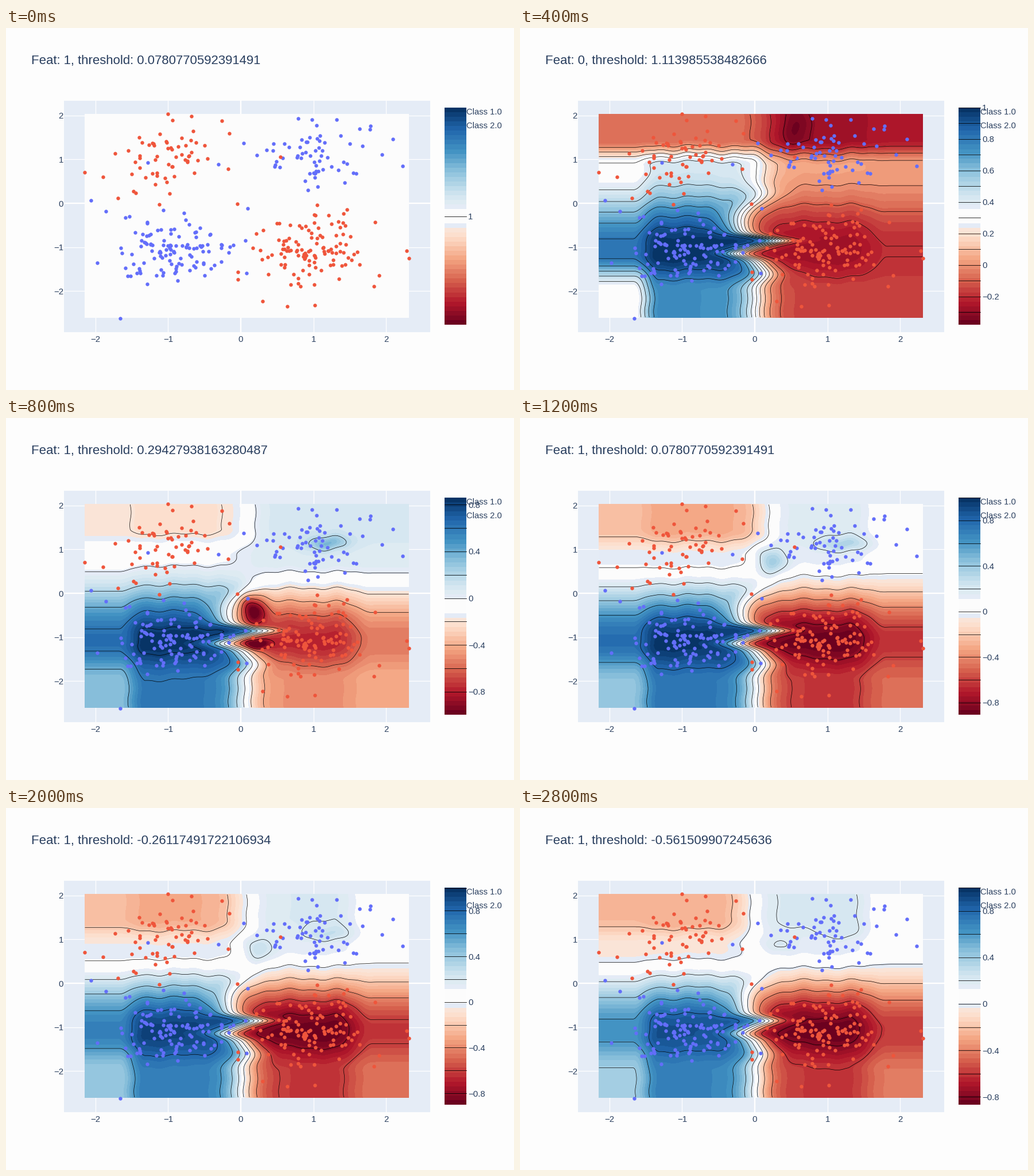
These frames come from a looping animation (885 by 632 pixels, 3 s). A matplotlib script:

```python
import numpy as np
import matplotlib.pyplot as plt
from matplotlib.animation import FuncAnimation
from matplotlib.colors import ListedColormap
from matplotlib.patches import Rectangle

W, H, PT = 885, 632, 0.72
INK, PAPER, PANEL = "#2a3f5f", "#fdfdfd", "#e5ecf6"
RED, BLUE = "#ef553b", "#636efa"
LEFT, RIGHT, TOP, BOTTOM = 137, 702, 151, 506.5
BAR_X, BAR_W, BAR_TOP, BAR_BOTTOM = 764, 37.5, 139, 518
BANDS, FRAMES = 47, 15

plt.rcParams["font.family"] = "Liberation Sans"
fig = plt.figure(figsize=(W / 100, H / 100), dpi=100, facecolor=PAPER)
ax = fig.add_axes([0, 0, 1, 1])
ax.set_axis_off()


def text(x, y, s, size=15, ha="left"):
    return ax.text(x, y, s, fontsize=size * PT, color=INK, ha=ha,
                   va="center_baseline", zorder=9)


# Diverging colour bands, near-zero values left pale
mid = BANDS // 2
bands = plt.get_cmap("RdBu")((np.arange(BANDS) + 0.5) / BANDS)
bands[mid - 1:mid + 2] = (0.992, 0.992, 0.992, 1)
bands[[mid - 2, mid + 2]] = (0.898, 0.925, 0.965, 1)
CMAP = ListedColormap(bands)


def cluster(seed, n, cx, cy, sx, sy, color, outliers):
    """A Gaussian cloud cut at two deviations, plus its outlying points."""
    rng = np.random.default_rng(seed)
    p = rng.normal(size=(3 * n, 2))
    p = p[np.hypot(*p.T) < 2.1][:n] * (sx, sy) + (cx, cy)
    x, y = np.vstack([p, outliers]).T
    ax.scatter(x, y, s=(6.4 * PT) ** 2, c=color, linewidths=0, zorder=6)


cluster(4, 112, 287, 384, 53, 36, BLUE,
        [(199, 507), (159, 410), (148, 301), (174, 320), (247, 235),
         (370, 238), (421, 315), (417, 371), (419, 428)])
cluster(7, 58, 540, 230, 56, 35, BLUE,
        [(691, 241), (674, 194), (635, 171), (634, 177), (509, 158),
         (655, 221), (414, 201), (541, 170)])
cluster(2, 54, 272, 228, 52, 34, RED,
        [(137, 252), (169, 260), (282, 150), (323, 154), (376, 162),
         (389, 184), (387, 246), (267, 308), (195, 297)])
cluster(9, 108, 537, 380, 55, 36, RED,
        [(702, 402), (698, 389), (447, 477), (490, 486), (538, 484),
         (641, 451), (404, 426), (404, 439), (403, 307), (478, 225),
         (650, 432), (643, 339)])

# Static panel, grid, ticks and legend text
ax.add_patch(Rectangle((101, 126.5), 638, 404.5, color=PANEL, lw=0, zorder=0))
for v in range(-2, 3):
    gx, gy, lw = 409 + 126.6 * v, 306 - 76.6 * v, 2.4 if v == 0 else 1.3
    ax.plot([gx, gx], [126.5, 531], color="white", lw=lw * PT, zorder=1)
    ax.plot([101, 739], [gy, gy], color="white", lw=lw * PT, zorder=1)
    label = str(v).replace("-", "−")
    text(gx, 542, label, ha="center")
    text(100, gy, label, ha="right")
text(802, 145.5, "Class 1.0", 14.7)
text(802, 169.5, "Class 2.0", 14.7)
title = text(44, 55.5, "", 22.1)

X, Y = np.meshgrid(np.arange(LEFT, RIGHT) + 0.5, np.arange(TOP, 507) + 0.0)


def ramp(x, a, b):
    t = np.clip((x - a) / (b - a), 0, 1)
    return t * t * (3 - 2 * t)


def bell(x, centre, width):
    return np.exp(-((x - centre) / width) ** 2)


# Contours waver near the clusters and run straight towards the sides
calm = ramp(X, 200, 250) * (1 - ramp(X, 590, 650))
YW = Y + calm * (1.6 * np.sin(X / 15) + 1.2 * np.sin(X / 6.5 + 1))
XW = X + 1.2 * np.sin(Y / 7)


def profile(top, middle, peak, bottom):
    """Score down one column, eased between four plateaus."""
    return (top + (middle - top) * ramp(YW, 195, 240)
            + (peak - middle) * ramp(YW, 245, 385)
            + (bottom - peak) * ramp(YW, 395, 460))


def field(far_left, left, right, far_right, top_edge, sway, spots=()):
    """Blend four columns around a winding middle border."""
    bend = (-30 * bell(Y, 340, 32) + 48 * bell(Y, 371, 8)
            - 32 * bell(Y, 394, 9) + 14 * bell(Y, 430, 16)
            + 14 * bell(Y, 288, 18))
    edge = top_edge + (412 - top_edge) * ramp(Y, 200, 300) + sway * bend
    wl, wr = ramp(XW, 198, 242), ramp(XW, 572, 638)
    a = profile(*far_left) * (1 - wl) + profile(*left) * wl
    b = profile(*right) * (1 - wr) + profile(*far_right) * wr
    mix = 0.5 + 0.5 * np.tanh((XW - edge) / 32)
    z = a * (1 - mix) + b * mix
    for cx, cy, rx, ry, amp in spots:
        z += amp * bell(XW, cx, rx) * bell(YW, cy, ry)
    return z


STAGES = {
    2: field((-.57, 0, .74, 0), (-.55, .18, 1, .62),
             (-.86, -.40, -.86, -.68), (-.80, -.41, -.74, -.68), 430, 1,
             [(478, 176, 24, 40, -.12)]),
    4: field((-.13, .02, .75, .42), (-.16, .05, .98, .72),
             (.18, .14, -.76, -.46), (.17, .13, -.52, -.37), 422, 1,
             [(560, 219, 36, 13, .3), (430, 333, 22, 26, -.6),
              (436, 394, 20, 8, -.45)]),
    6: field((-.30, -.08, .75, .40), (-.38, -.09, .98, .72),
             (.14, .08, -.98, -.71), (0, .02, -.72, -.57), 425, .9,
             [(437, 250, 26, 26, .3), (565, 221, 48, 13, .2)]),
    14: field((-.32, -.13, .60, .35), (-.36, -.12, .88, .67),
              (.165, .08, -.98, -.71), (0, 0, -.70, -.53), 398, .6,
              [(450, 238, 36, 14, .08), (560, 219, 40, 14, .06)]),
}

# Limits of the colour bar at the frames where they turn
RANGE_AT = [2, 4, 6, 8, 10, 14]
LOWS = [-0.38, -0.996, -0.906, -0.914, -0.9, -0.867]
HIGHS = [1.0, 0.859, 1.0, 0.997, 1.003, 1.0]
TITLES = ["1, threshold: 0.0780770592391491",
          "0, threshold: -0.4127150634765625",
          "0, threshold: 1.113985538482666",
          "1, threshold: 0.4410826861858368",
          "1, threshold: 0.29427938163280487",
          "1, threshold: 0.18240652978420258",
          "1, threshold: 0.0780770592391491",
          "1, threshold: 0.01462830649316311",
          "1, threshold: -0.04930484853684902",
          "1, threshold: -0.1538260281085968",
          "1, threshold: -0.26117491722106934",
          "1, threshold: -0.3390274345874786",
          "1, threshold: -0.41850629448890686",
          "1, threshold: -0.4926183819770813",
          "1, threshold: -0.561509907245636"]


def score(i):
    keys = list(STAGES)
    i = max(i, keys[0])
    for a, b in zip(keys, keys[1:]):
        if i <= b:
            t = (i - a) / (b - a)
            return STAGES[a] * (1 - t) + STAGES[b] * t


def picture(data, extent, z):
    return ax.imshow(data, extent=extent, cmap=CMAP, vmin=-1, vmax=1,
                     interpolation="nearest", aspect="auto", zorder=z)


heat = picture(np.zeros_like(X), (LEFT, RIGHT, BOTTOM, TOP), 2)
picture(np.linspace(1, -1, BANDS)[:, None],
        (BAR_X, BAR_X + BAR_W, BAR_BOTTOM, BAR_TOP), 3)
ax.set_xlim(0, W)
ax.set_ylim(H, 0)

extras = []


def tick(y, label=None):
    extras.extend(ax.plot([BAR_X, BAR_X + BAR_W], [y, y], color="black",
                          lw=0.8 * PT, zorder=4))
    if label:
        extras.append(text(805, y, label.replace("-", "−")))


def draw(i):
    while extras:
        extras.pop().remove()
    title.set_text("Feat: " + TITLES[i])
    if i == 0:
        heat.set_data(np.zeros_like(X))
        tick(328.5, "1")
        return
    z = score(i)
    heat.set_data(np.clip(z, -1, 1))
    low, high = np.interp(i, RANGE_AT, LOWS), np.interp(i, RANGE_AT, HIGHS)
    step = 0.2 if high - low > 1.6 else 0.1
    ks = np.arange(np.ceil(low / step), np.floor(high / step + 1e-6) + 1)
    levels = (2 * ks * step - high - low) / (high - low)
    extras.append(ax.contour(X[::2, ::2], Y[::2, ::2], z[::2, ::2], levels,
                             colors="black", linestyles="solid",
                             linewidths=0.7 * PT, zorder=4))
    for k, s in zip(ks, levels):
        y = BAR_BOTTOM - (s + 1) / 2 * (BAR_BOTTOM - BAR_TOP)
        tick(y, "%g" % round(k * step, 1) if k % 2 == 0 else None)


anim = FuncAnimation(fig, draw, frames=FRAMES, interval=200,
                     init_func=lambda: [], repeat=True, repeat_delay=0,
                     blit=False)
plt.show()
```
